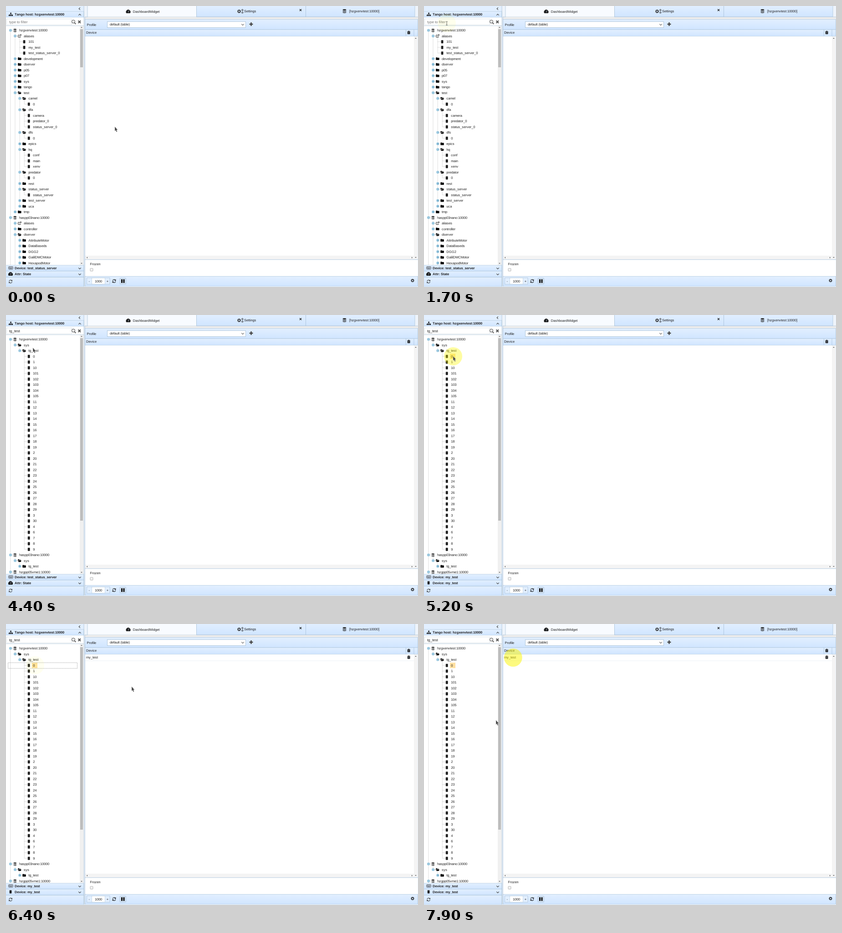
An HTML page for the animation above (8000 ms loop, 905x619 px).

```html
<!DOCTYPE html>
<html>
<head>
<meta charset="utf-8">
<style>
html, body { margin: 0; width: 100%; height: 100%; overflow: hidden; background: #fff; }
svg { display: block; width: 905px; height: 619px; }
text { font: 7.5px "Liberation Sans", Arial, sans-serif; fill: #222; text-rendering: geometricPrecision; white-space: pre; }
.bold { font-weight: bold; }
.input { font-size: 8px; }
.line { fill: none; stroke: #a4bed4; stroke-width: .7; }
.thin { fill: none; stroke: #444; stroke-width: 1.1; }
.dots { fill: none; stroke: #999; stroke-width: .6; stroke-dasharray: .8 .7; }
</style>
</head>
<body>
<svg id="stage" viewBox="0 0 905 619" xmlns="http://www.w3.org/2000/svg"></svg>
<script>
const stage = document.getElementById('stage');
const ruler = document.createElement('canvas').getContext('2d');

// Glyph positions with advances snapped to whole pixels of a double-density screen; the last one is the end.
function snap(x, s, kind = '') {
  ruler.font = `${kind == 'bold' ? 'bold ' : ''}${kind == 'input' ? 16 : 15}px "Liberation Sans", Arial, sans-serif`;
  const at = [x];
  for (const c of s) at.push(at.at(-1) + Math.round(ruler.measureText(c).width) / 2);
  return at;
}

const text = (x, y, s, kind = '') => `<text x="${snap(x, s, kind).slice(0, -1).join(' ')}" y="${y + 2.6}" class="${kind}">${s}</text>`;
const rect = (x, y, w, h, fill, attr = '') => `<rect x="${x}" y="${y}" width="${w}" height="${h}" fill="${fill}" ${attr}/>`;
const path = (d, attr = '') => `<path d="${d}" ${attr}/>`;
const icon = (name, x, y, attr = '') => `<use href="#${name}" x="${x}" y="${y}" ${attr}/>`;
const group = (id, body, attr = '') => `<g id="${id}" ${attr}>${body}</g>`;
const line = d => path(d, 'class="line"');
const thin = d => path(d, 'class="thin"');
const band = y => `M-3.2 ${y}c0 1.2 6.4 1.2 6.4 0v.9c0 1.2-6.4 1.2-6.4 0z`;
const gear = (x, y, r) =>
  `<g transform="translate(${x} ${y})" fill="none" stroke="#222"><circle r="${r * .58}" stroke-width="${r * .34}"/>` +
  `<circle r="${r * .86}" stroke-width="${r * .28}" pathLength="16" stroke-dasharray="1 1"/></g>`;

// Icons are centred on their own origin.
const icons = {
  db: path('M-3.2-2.6c0-1.2 6.4-1.2 6.4 0v.4c0 1.2-6.4 1.2-6.4 0z' + band(-1.5) + band(.2) + band(1.9), 'fill="#222"'),
  folder: path('M-3.7-2.4q0-.6.6-.6h2.2l.7.9h3.3q.6 0 .6.6v3.6q0 .6-.6.6h-6.2q-.6 0-.6-.6z'),
  open: path('M-3.7 1.7v-4q0-.6.6-.6h2l.7.9h2.7q.6 0 .6.6v.6h-4.4q-.8 0-1.2.7zM-3.2 2.7l1.3-2.5q.2-.4.7-.4h5.3l-1.4 2.5q-.2.4-.7.4z'),
  alias: path('M.4-2.3h-3q-.6 0-.6.6v3.8q0 .6.6.6h4q.6 0 .6-.6v-1.6M-.8.6L3-3', 'fill="none" stroke="#111" stroke-width=".9"') +
    path('M.9-3.5h2.8v2.8z'),
  chip: rect(-1.8, -3.5, 3.6, 7, '#111', 'rx=".5"') +
    path('M-2.3-2.9v6M2.3-2.9v6', 'fill="none" stroke="#111" stroke-width=".9" stroke-dasharray=".9 .7"'),
  gauge: path('M-4.2 3.4a4.9 4.9 0 1 1 8.4 0z') +
    path('M0 1.8L.9-1.4M-3 .9h.1M3 .9h-.1M-2.1-1.4h.1M2.1-1.4h.1M0-2.5h.1', 'fill="none" stroke="#e8f2ff" stroke-width=".9" stroke-linecap="round"'),
  sitemap: path('M-1.2-3.7h2.4v2.2h-2.4zM-4.5 1.3h2.5v2.3h-2.5zM-1.2 1.3h2.4v2.3h-2.4zM2 1.3h2.5v2.3h-2.5z') +
    path('M0-2V2M-3.3 2V0H3.3V2', 'fill="none" stroke="#111" stroke-width=".7"'),
  keys: rect(-4.7, -2.7, 9.4, 5.4, 'none', 'rx=".5" stroke="#222" stroke-width=".8"') +
    path('M-3.5-1.1h7M-3.5.2h7M-2.4 1.5h4.8', 'fill="none" stroke="#222" stroke-width=".8" stroke-dasharray=".9 .5"'),
  trash: path('M-3.4-2.6h2l.5-1h1.8l.5 1h2v.9h-6.8zM-2.8-1.3h5.6v4.2q0 .8-.8.8h-4q-.8 0-.8-.8z') +
    path('M-1.3-.4v3M0-.4v3M1.3-.4v3', 'stroke="#d9eaff" stroke-width=".5"'),
  refresh: path('M-3.3-.7A3.4 3.4 0 0 1 2.6-2.2M3.3.7A3.4 3.4 0 0 1-2.6 2.2', 'fill="none" stroke="currentColor" stroke-width="1.1"') +
    path('M3.9-3.9v3.2H.7zM-3.9 3.9V.7h3.2z', 'fill="currentColor"'),
  plus: path('M-1.2-3.9h2.4v2.7h2.7v2.4h-2.7v2.7h-2.4v-2.7h-2.7v-2.4h2.7z', 'fill="#444"'),
  cross: path('M-2.7-2.7L2.7 2.7M2.7-2.7L-2.7 2.7', 'fill="none" stroke="currentColor"'),
  up: thin('M-2.7 1.4L0-1.4 2.7 1.4'),
  down: thin('M-2.7-1.4L0 1.4 2.7-1.4'),
  left: thin('M1.4-2.7L-1.4 0 1.4 2.7'),
};

const kinds = { d: 'db', a: 'alias', o: 'open', f: 'folder', c: 'chip' };

// Each entry is depth, icon letter, then the label.
function tree(spec) {
  const last = [];
  let lines = '', marks = '';
  spec.split('|').forEach((entry, i) => {
    const depth = +entry[0], kind = entry[1], label = entry.slice(2);
    const y = 53.7 + 12.5 * i, x = 9.8 + 10.15 * depth;
    const from = Math.max(last[depth] ?? 0, last[depth - 1] ?? 0);
    if (from) lines += `M${x} ${from}V${y}`;
    lines += `M${x} ${y}h7`;
    last[depth] = y;
    if (kind != 'c') {
      marks += rect(x - 2.1, y - 2.3, 4.4, 4.4, '#cfe7f4', 'rx=".8" stroke="#4a9cc6" stroke-width=".8"') +
        path(`M${x - 1.3} ${y - .1}h2.8` + (kind == 'f' ? `M${x + .1} ${y - 1.5}v2.8` : ''), 'stroke="#2a7ba8" stroke-width=".7"');
    }
    marks += icon(kinds[kind], x + 9.9, y) + text(x + 19.1, y, label);
  });
  return path(lines, 'class="dots"') + marks;
}

const fullTree = '0dhzgxenvtest:10000|1aaliases|2c101|2cmy_test|2ctest_status_server_0|1fdevelopment|1fdserver|1fp05|1fp07|1fsys|1ftango|' +
  '1otest|2ocamel|3c0|2odfa|3ccamera|3cpredator_0|3cstatus_server_0|2odfs|3c0|2fepics|2ohq|3cconf|3cmain|3cxenv|2opredator|3c0|' +
  '2frest|2ostatus_server|3cstatus_server|2ftest_server|2fuca|1ftmp|0dhaspp03nano:10000|1aaliases|1fcontroller|1odserver|' +
  '2fAttributeMotor|2fDataBaseds|2fDGG2|2fGalilDMCMotor|2fHexapodMotor|2f|1f|0d';
// Device numbers in string order, as the server sorts them.
const devices = [...Array(31).keys(), 101, 102, 103, 104, 105].filter(n => n != 5).map(String).sort();
const foundTree = '0dhzgxenvtest:10000|1osys|2otg_test|' + devices.map(n => '3c' + n).join('|') +
  '|0dhaspp03nano:10000|1osys|2ftg_test|0dhzgpp05vme1:10000|0d';

const thumb = h => rect(163, 51, 6, h, '#bdbdbd');
const arrow = (x, y, turn) => path('M-1.8 1L0-1 1.8 1z', `fill="#555" transform="translate(${x} ${y}) rotate(${turn})"`);
const tab = (x, w, fill) => rect(x, -2, w, 26, fill, 'stroke="#a4bed4" stroke-width=".7"');
const bar = (x, y, w, h) => rect(x, y, w, h, 'url(#blue)', 'stroke="#a4bed4" stroke-width=".6"');

const leftPanel =
  rect(0, 0, 171, 12, '#e2efff') + bar(-1, 12, 172, 13) + rect(0, 25.3, 171, 18, '#fff') +
  icon('left', 161.5, 6) + icon('sitemap', 10.5, 18.5) + icon('up', 162, 19.3) +
  text(19, 18.4, 'Tango host: hzgxenvtest:10000', 'bold') +
  rect(1.5, 28.5, 143, 13, '#fff', 'stroke="#c6d2dc" stroke-width=".6"') +
  '<circle cx="148" cy="34.3" r="3.3" fill="none" stroke="#555" stroke-width="1.1"/>' +
  path('M150.4 36.8l3 3', 'stroke="#555" stroke-width="1.7"') +
  icon('cross', 161.3, 35, 'color="#555" stroke-width="2"') +
  line('M0 43.5H171') +
  '<g clip-path="url(#treeClip)">' +
    rect(162, 44, 8.5, 527, '#f0f0f0') +
    group('full', tree(fullTree) + thumb(84)) +
    group('found', rect(57, 85.2, 12, 12, '#ffe0a0', 'id="picked"') + tree(foundTree) + thumb(402)) +
  '</g>' +
  arrow(166, 47, 0) + arrow(166, 567, 180) +
  rect(4.5, 85.2, 152, 12.6, 'none', 'id="ring" stroke="#666" stroke-width=".6" stroke-dasharray=".8 .6"') +
  bar(-1, 571, 172, 13) + bar(-1, 584, 172, 13) + bar(-1, 597.5, 172, 20.5) +
  icon('keys', 10.5, 577) + icon('down', 162, 578) + icon('down', 162, 591) +
  group('before', text(19, 577, 'Device: test_status_server', 'bold') + icon('gauge', 10, 590.5) + text(19, 590, 'Attr: State', 'bold')) +
  group('after', text(19, 577, 'Device: my_test', 'bold') + icon('chip', 10, 590) + text(19, 590, 'Device: my_test', 'bold')) +
  icon('refresh', 10, 607, 'color="#444"') + line('M171 0V618');

const rightPanel =
  rect(173, 0, 732, 618, '#e2efff') + rect(173, 0, 732, 24, '#eef4fb') +
  tab(179, 239.5, '#f8fbff') + tab(418.5, 240, 'url(#blue)') + tab(658.5, 239.5, 'url(#blue)') +
  rect(173, 24, 732, 5, '#ececec') + line('M173 24H179M418 24H905') +
  icon('gauge', 268.5, 12.3) + text(278.7, 12, 'DashboardWidget') +
  gear(512, 11.7, 4) + gear(519.3, 9, 2.3) + gear(519.3, 14.4, 2.3) + text(523, 11.5, 'Settings') +
  icon('cross', 647, 9, 'color="#111" stroke-width="1.4" style="transform:scale(.8);transform-origin:647px 9px"') +
  icon('db', 743.5, 11.2, 'style="transform:scale(1.2);transform-origin:743.5px 11.2px"') + text(754, 11.5, '[hzgxenvtest:10000]') +
  bar(173.5, 29.5, 731, 22.5) + text(177.5, 41, 'Profile') +
  rect(222.5, 34.3, 304, 13.3, '#fff', 'stroke="#a4bed4" stroke-width=".8"') + text(228, 40.8, 'default (table)') +
  icon('down', 520, 41, 'opacity=".8"') + icon('plus', 538.5, 40) +
  bar(173.5, 52, 731, 14.5) + text(176, 58.8, 'Device') + line('M878.5 52V66M896 52V66') + icon('trash', 884.7, 58.3) +
  rect(174, 66.8, 722, 483.5, '#fff') + rect(896, 66.8, 8.5, 491, '#f4f4f4') + rect(174, 550, 722, 8.3, '#f4f4f4') +
  arrow(900, 71, 0) + arrow(900, 554, 180) + arrow(178, 554.3, -90) + arrow(892, 554.3, 90) +
  group('row', text(176, 73.4, 'my_test') + icon('trash', 884.7, 73) + path('M174 81H896', 'stroke="#e4edf5" stroke-width=".7"')) +
  rect(174, 559, 730.5, 36.5, '#fff') + line('M173 558.7H905') + text(184.5, 568.7, 'Frozen') +
  rect(185, 578, 6, 6, '#f3f3f3', 'rx=".8" stroke="#999" stroke-width=".7"') +
  bar(173.5, 595.5, 731, 22) +
  rect(177.5, 598.8, 50.5, 14.2, '#e2efff', 'stroke="#a4bed4" stroke-width=".7"') +
  rect(188.5, 599, 29, 13.8, '#fff', 'stroke="#a4bed4" stroke-width=".5"') +
  text(181.6, 606, '-') + text(195, 606, '1000') + text(220.7, 606, '+') +
  icon('refresh', 237.5, 606, 'color="#111"') +
  rect(250, 599.3, 13.5, 13.5, '#d0dff0', 'rx="1" stroke="#a4bed4" stroke-width=".6"') +
  path('M253 602h3v8h-3zM257.5 602h3v8h-3z', 'fill="#111"') +
  gear(893, 604.7, 3.8) + line('M173.3 24V618');

stage.innerHTML =
  '<defs><linearGradient id="blue" x2="0" y2="1"><stop stop-color="#e2efff"/><stop offset="1" stop-color="#d0e5ff"/></linearGradient>' +
  '<clipPath id="treeClip"><path d="M0 44H171V571H0z"/></clipPath>' +
  Object.entries(icons).map(([id, body]) => group(id, body)).join('') + '</defs>' +
  rect(0, 0, 905, 619, '#fff') + rect(171, 0, 3, 619, '#edf2f8') + leftPanel + rightPanel +
  '<text id="query" y="37.5" class="input"></text>' +
  rect(0, 30.2, .8, 8.6, '#111', 'id="caret"') +
  '<circle id="halo" r="20" fill="#fbf600"/>' +
  group('pointer', path('M0-.3V9.5L2 7.7 3.6 11.4 5.3 10.6 3.7 7.1H6.3z', 'fill="#444" stroke="#ddd" stroke-width=".4"')) +
  group('beam', path('M-1.7-4h1.2L0-3.5.5-4h1.2M0-3.5V3.7M-1.7 4.2h1.2L0 3.7l.5.5h1.2', 'fill="none" stroke="#333" stroke-width=".8"'));

const el = Object.fromEntries([...stage.querySelectorAll('[id]')].map(e => [e.id, e]));
const show = (id, on) => el[id].setAttribute('display', on ? 'inline' : 'none');
const place = (id, [x, y]) => el[id].setAttribute('transform', `translate(${x} ${y})`);

// Interpolates keys of the form [time, ...values].
function track(keys, t, ease = u => u) {
  const n = keys.findIndex(k => k[0] > t);
  if (n < 1) return keys.at(n).slice(1);
  const a = keys[n - 1], b = keys[n], u = ease((t - a[0]) / (b[0] - a[0]));
  return a.slice(1).map((v, i) => v + (b[i + 1] - v) * u);
}
const smooth = u => u * u * (3 - 2 * u);

const moves = [[0, 239, 266], [100, 239, 266], [900, 50, 38], [4100, 50, 38], [4600, 64, 91], [5600, 64, 91],
  [5900, 276, 138], [6600, 276, 138], [7000, 206, 60], [7200, 195, 74], [7600, 195, 74], [7900, 158, 212]];
const glow = [[0, 0], [900, 0], [1000, .07], [1200, .5], [1400, .5], [1700, .07], [2000, 0], [4500, 0], [4800, .5],
  [5100, .5], [5200, .37], [5300, .22], [5500, .5], [6100, .5], [6400, .06], [6500, 0], [7500, 0], [7800, .5]];
const typed = [[2000, 1], [2200, 2], [2400, 3], [2900, 5], [3100, 6], [3200, 7]];

function draw() {
  const t = Math.floor(performance.now() % 8000 / 100) * 100;

  const count = typed.filter(k => k[0] <= t).at(-1)?.[1] ?? 0;
  const query = count ? 'tg_test'.slice(0, count) : 'type to filter';
  const stops = snap(7, query, 'input');
  el.query.textContent = query;
  el.query.setAttribute('x', stops.slice(0, -1).join(' '));
  el.query.style.fill = count ? '#222' : '#777';
  el.caret.setAttribute('x', stops[count]);
  show('caret', t >= 900 && t < 1500 || t >= 2000 && t < 3900);

  show('full', t < 2900);
  show('found', t >= 2900);
  show('picked', t >= 4800);
  show('before', t < 4800);
  show('after', t >= 4800);
  show('ring', t >= 5700 && t < 7600);
  show('row', t >= 6200);

  const [x, y] = track(moves, t, smooth);
  const inField = x < 145 && y < 43;
  show('beam', inField);
  show('pointer', !inField);
  place('beam', [x, y]);
  place('pointer', [x, y]);
  place('halo', t < 4400 ? [50, 38] : t < 7000 ? [64, 91] : [195.7, 74]);
  el.halo.setAttribute('opacity', track(glow, t)[0]);
  requestAnimationFrame(draw);
}
draw();
</script>
</body>
</html>
```
